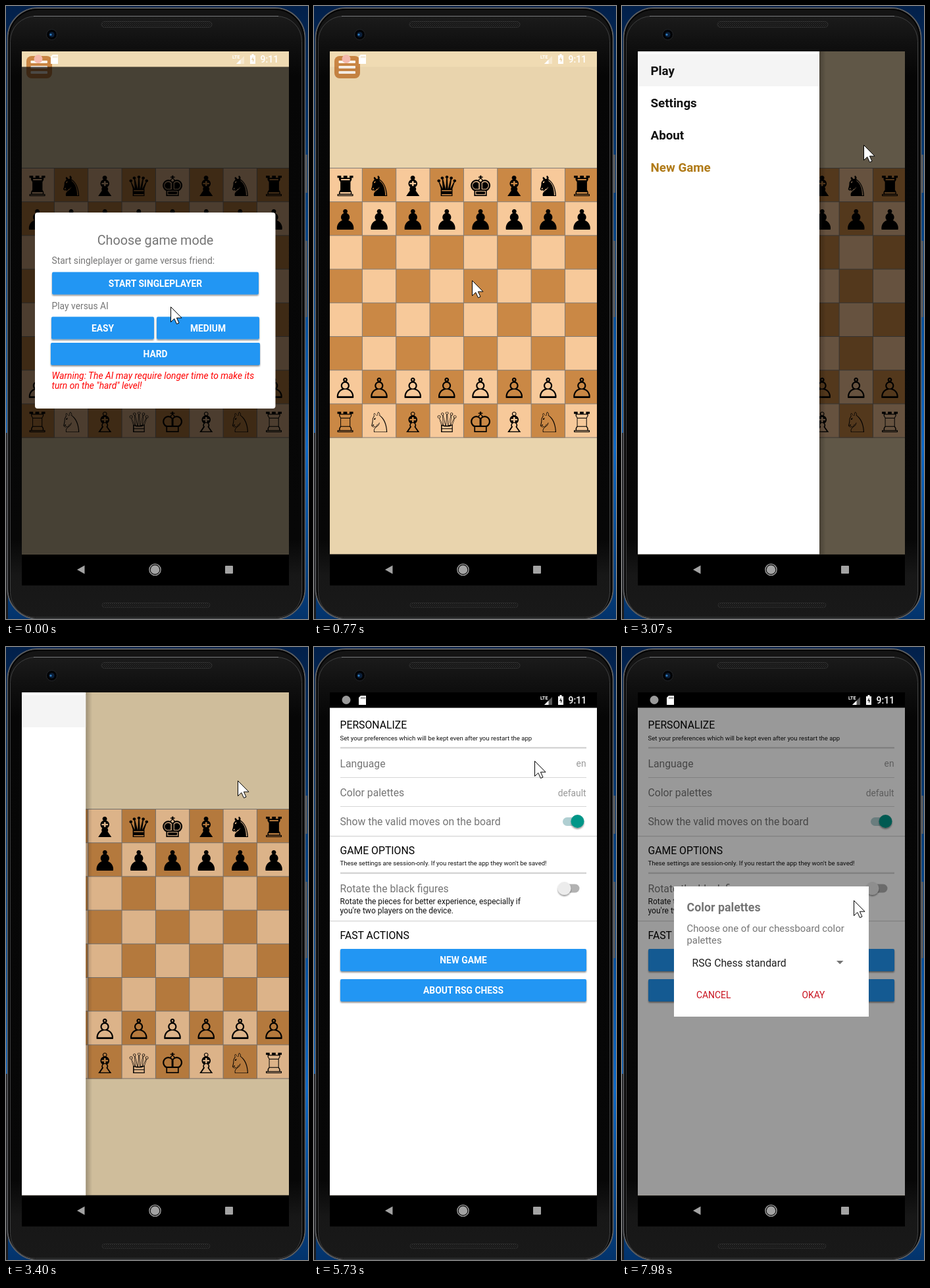
Recreate the animation shown at these times as an HTML page. Size 459 by 932 pixels, loop 8 s.

```html
<!DOCTYPE html>
<html lang="en">
<head>
<meta charset="utf-8">
<title>Chess app demo</title>
<style>
html, body { margin: 0; width: 100%; height: 100%; overflow: hidden; background: #03254f; }
svg { display: block; width: 459px; height: 932px; }
text { font-family: Roboto, sans-serif; white-space: pre; }
.b { font-weight: 700; }
.m { text-anchor: middle; }
.e { text-anchor: end; }
.man { font-family: "DejaVu Sans", sans-serif; text-anchor: middle; }
</style>
</head>
<body>
<svg id="stage" viewBox="0 0 459 932"></svg>
<script>
const rect = (x, y, w, h, fill, more = '') =>
  `<rect x="${x}" y="${y}" width="${w}" height="${h}" fill="${fill}" ${more}/>`;
const path = (d, fill, more = '') => `<path d="${d}" fill="${fill}" ${more}/>`;
const disc = (x, y, r, fill, more = '') => `<circle cx="${x}" cy="${y}" r="${r}" fill="${fill}" ${more}/>`;
const text = (x, y, size, fill, s, cls = '', more = '') =>
  `<text x="${x}" y="${y}" font-size="${size}" fill="${fill}" class="${cls}" ${more}>${s}</text>`;
const group = (id, s, more = '') => `<g id="${id}" ${more}>${s}</g>`;
const button = (x, y, w, h, s) =>
  rect(x, y, w, h, '#2196f3', 'rx="2" filter="url(#lift)"') +
  text(x + w / 2, y + h / 2 + 5.3, 13.8, '#fff', s, 'b m');

// ---- phone ----
const defs = `<defs>
  <linearGradient id="desk" x2="0" y2="1">
    <stop offset="0" stop-color="#02204a"/><stop offset=".25" stop-color="#053a75"/>
    <stop offset=".45" stop-color="#064a92"/><stop offset=".72" stop-color="#0c6aca"/>
    <stop offset=".85" stop-color="#07509c"/><stop offset="1" stop-color="#03336b"/>
  </linearGradient>
  <linearGradient id="shell" x2="0" y2="1">
    <stop offset="0" stop-color="#1b1b1b"/><stop offset=".05" stop-color="#0f0f0f"/>
    <stop offset=".1" stop-color="#060606"/><stop offset=".87" stop-color="#070707"/>
    <stop offset=".93" stop-color="#171717"/><stop offset="1" stop-color="#191919"/>
  </linearGradient>
  <linearGradient id="edge">
    <stop offset="0" stop-color="#000" stop-opacity=".24"/><stop offset="1" stop-color="#000" stop-opacity="0"/>
  </linearGradient>
  <pattern id="mesh" width="3" height="3" patternUnits="userSpaceOnUse">
    ${rect(0, 0, 3, 3, '#0c0c0c')}${path('M0 0L3 3M3 0L0 3', 'none', 'stroke="#3a3a3a" stroke-width=".6"')}
  </pattern>
  <filter id="lift" x="-5%" y="-20%" width="110%" height="150%">
    <feDropShadow dx="0" dy="1.8" stdDeviation="1.3" flood-opacity=".45"/>
  </filter>
  <clipPath id="screen">${rect(24, 69, 406, 764.5, '#fff')}</clipPath>
</defs>`;

const phone =
  rect(0, 0, 459, 932, 'url(#desk)') +
  rect(0, 649, 3, 283, '#1c1d20') +
  rect(454, 226, 4, 58, '#55585d') + rect(454, 357, 4, 116, '#55585d') +
  rect(2.5, 3, 452, 929, '#141414', 'rx="46" stroke="#5c5e61" stroke-width="2"') +
  rect(4.5, 5, 448, 925, 'none', 'rx="44" stroke="#050505" stroke-width="2"') +
  rect(6.5, 15.5, 443, 914, 'url(#shell)', 'rx="38" stroke="#3f4041"') +
  path('M42 15.5H414', 'none', 'stroke="#77797b"') +
  rect(145, 23.5, 168, 9, 'url(#mesh)', 'rx="4.5" stroke="#2f2f2f"') +
  rect(146, 907.5, 164, 7, 'url(#mesh)', 'rx="3.5" stroke="#2a2a2a"') +
  disc(69.5, 43.5, 8, '#020305', 'stroke="#25272a"') +
  disc(69.5, 43.5, 4, '#0a1f3a') + disc(68, 43.5, 1.6, '#2f7fc4') +
  rect(24, 69, 406, 812, '#000') +
  path('M108 857L119.5 850.5V863.5Z', '#a3a3a3') +
  disc(226.5, 857, 6.8, '#a3a3a3') +
  disc(226.5, 857, 8.6, 'none', 'stroke="#a3a3a3" stroke-width="1.4"') +
  rect(333, 851, 12, 12, '#a3a3a3', 'rx="1"');

// ---- board ----
const LIGHT = '#ffcf9f', DARK = '#d18c47', SAND = '#f0dbb3';
const ROWS = { 0: '♜♞♝♛♚♝♞♜', 1: '♟♟♟♟♟♟♟♟', 6: '♙♙♙♙♙♙♙♙', 7: '♖♘♗♕♔♗♘♖' };
const DX = 51.35, DY = 51.2;

// Type size and base line at which a rook is 31.5 px tall.
function rookFit() {
  const pen = document.createElement('canvas').getContext('2d');
  pen.font = '100px "DejaVu Sans", sans-serif';
  const ink = pen.measureText('♜');
  const up = ink.actualBoundingBoxAscent, down = ink.actualBoundingBoxDescent;
  const size = 3150 / (up + down);
  return [size, 43.2 - down * size / 100];
}

function board() {
  const [size, base] = rookFit();
  let cells = '', men = '', lines = '';
  for (let r = 0; r < 8; r++) for (let c = 0; c < 8; c++) {
    const x = 22 + c * DX, y = 246.5 + r * DY;
    cells += rect(x, y, DX + .5, DY + .5, (r + c) % 2 ? DARK : LIGHT);
    if (ROWS[r]) men += text(x + 25.7, y + base, size, '#000', ROWS[r][c], 'man');
  }
  for (let i = 0; i < 9; i++)
    lines += `M24 ${246.5 + i * DY}H430M${22 + i * DX} 246.5V656`;
  return cells + path(lines, 'none', 'stroke="#85807c"') + men;
}

const burger = rect(31, 76, 39, 34, DARK, 'rx="8" id="key"') +
  group('bars', [83, 91, 99].map(y => rect(37.5, y, 25.5, 4, 'currentColor', 'rx="1"')).join(''));

const statusIcons = (dot, bolt) =>
  disc(49, 80.5, 6.5, dot) +
  path('M71 74H79V88H68V77Z', '#fff') + path('M72 76V79M74.5 76V79M77 76V79', 'none', `stroke="${bolt}"`) +
  text(344, 79.5, 7, '#fff', 'LTE', 'b') +
  path('M350 88L362 76V88Z', '#fff', 'opacity=".35"') + path('M350 88L356.5 81.5V88Z', '#fff') +
  path('M371 75H373.5V73H376.5V75H379V88H371Z', '#fff') +
  path('M375.5 76.5L373 82H375V86L377.5 80.5H375.5Z', bolt) +
  text(386.5, 86, 14, '#fff', '9:11', '', 'font-weight="500"');

// ---- panels ----
const GREY = '#757575';
const modeDialog =
  rect(44, 314, 365.5, 298, '#fff', 'rx="4"') +
  text(227, 362.5, 19.75, GREY, 'Choose game mode', 'm') +
  text(69.5, 392, 13.85, GREY, 'Start singleplayer or game versus friend:') +
  button(70, 404.5, 314, 34, 'START SINGLEPLAYER') +
  text(69.5, 461, 13.85, GREY, 'Play versus AI') +
  button(69, 472.5, 156, 34, 'EASY') + button(229, 472.5, 156, 34, 'MEDIUM') +
  button(68, 512, 318, 34, 'HARD') +
  ['Warning: The AI may require longer time to make its', 'turn on the "hard" level!']
    .map((s, i) => text(69.5, 566.5 + i * 15.5, 13.83, '#f00', s, '', 'font-style="italic"')).join('');

const drawer =
  rect(300, 69, 10, 765, 'url(#edge)') + rect(24, 69, 276, 765, '#fff') +
  rect(24, 73, 276, 49, '#f4f4f4') +
  ['Play', 'Settings', 'About', 'New Game'].map((s, i) =>
    text(43.5, 104.5 + i * 49, 18.8, i < 3 ? '#111' : '#b07a17', s, 'b')).join('');

const rule = (y, h, full) => rect(full ? 24 : 40, y, full ? 406 : 374, h, '#d6d6d6');
const label = (y, s, fill = GREY) => text(39.5, y, 15.75, fill, s);
const note = (y, s, size) => text(39.5, y, size, '#111', s);
const settings =
  rect(24, 69, 406, 765, '#fff') + rect(24, 69, 406, 23.5, '#000') + statusIcons('#9b9b9b', '#333') +
  label(124, 'PERSONALIZE', '#000') +
  note(142, 'Set your preferences which will be kept even after you restart the app', 9.57) +
  rule(152, 2.5) + label(182.5, 'Language') + text(413.5, 182, 13.8, '#999', 'en', 'e') +
  rule(198, 1) +
  group('palRow', label(227, 'Color palettes') + text(413.5, 226.5, 13.8, '#999', 'default', 'e')) +
  rule(242, 1) + label(271, 'Show the valid moves on the board') +
  rect(378, 259, 28, 13, '#b0cfd2', 'rx="6.5"') + disc(400.5, 265, 10, '#009688', 'filter="url(#lift)"') +
  rule(287, 1.3, true) + label(314.5, 'GAME OPTIONS', '#000') +
  note(332, "These settings are session-only. If you restart the app they won't be saved!", 9.57) +
  rule(342.5, 2.5) + label(372.5, 'Rotate the black figures') +
  rect(376, 360.5, 27.5, 13, '#b2b2b2', 'rx="6.5"') + disc(380.5, 367, 10, '#ececec', 'filter="url(#lift)"') +
  note(391, 'Rotate the pieces for better experience, especially if', 12) +
  note(405, "you're two players on the device.", 12) +
  rule(416, 1.3, true) + label(444, 'FAST ACTIONS', '#000') +
  button(40, 459, 374, 34, 'NEW GAME') + button(40, 505, 374, 34, 'ABOUT RSG CHESS');

const paletteDialog =
  rect(79, 364, 296, 198, '#fff') +
  text(98.5, 402, 17.8, GREY, 'Color palettes', 'b') +
  text(98.5, 433, 14.85, GREY, 'Choose one of our chessboard color') +
  text(98.5, 450.5, 14.85, GREY, 'palettes') +
  text(106.5, 485.5, 15.75, '#212121', 'RSG Chess standard') +
  path('M326 477H336.5L331.25 482.3Z', GREY) +
  text(113, 533.5, 13.9, '#c8101c', 'CANCEL') + text(273.5, 533.5, 13.8, '#c8101c', 'OKAY');

const arrow = path('M.5.5V23.5L5.8 18.500 9.500 26.500 13 25 9.400 17.200H17Z', '#fff');

document.getElementById('stage').innerHTML = defs + phone +
  `<g clip-path="url(#screen)">` +
  rect(24, 69, 406, 765, SAND) + board() + group('burger', burger) +
  rect(24, 92.5, 406, 742, '#000', 'id="modeDim"') +
  group('homeStatus', statusIcons('#f4b9ad', '#e9d2a8')) +
  rect(24, 69, 406, 765, '#000', 'id="drawerDim"') + group('drawer', drawer) +
  group('modeDialog', modeDialog) + group('settings', settings) +
  rect(24, 92.5, 406, 742, '#000', 'id="palDim"') + group('palDialog', paletteDialog) +
  '</g>' + group('cursor', arrow);

// ---- motion ----
const $ = id => document.getElementById(id);
const attr = (id, name, v) => $(id).setAttribute(name, v);
const alpha = (id, v) => attr(id, 'opacity', clamp(v));
const move = (id, x, y) => attr(id, 'transform', `translate(${x} ${y})`);
const clamp = v => Math.max(0, Math.min(1, v));
const smooth = v => (v = clamp(v), v * v * (3 - 2 * v));
const mix = (a, b, p) => a + (b - a) * p;

// Number of picture steps done out of n, the first at a and the last at b.
const steps = (t, a, b, n) => t < a ? 0 : t >= b ? n :
  Math.min(n, 1 + Math.floor((t - a) / (b - a) * (n - 1) + .03));

function cursorAt(t) {
  const go = (a, b, p, q = p) => [mix(a[0], b[0], p), mix(a[1], b[1], q)];
  if (t < 1000) return go([250, 457], [240, 417], steps(t, 80, 230, 3) / 3);
  if (t < 1840) return go([240, 417], [77, 104], smooth(steps(t, 1000, 1770, 11) / 11));
  if (t < 2230) return go([77, 104], [56, 96], steps(t, 1840, 2000, 3) / 3);
  if (t < 3070) return go([56, 96], [365, 210], smooth((steps(t, 2230, 3000, 11) - 2) / 9));
  if (t < 4090) {
    const u = clamp((steps(t, 3240, 4020, 11) - 2) / 9);
    return u < .8 ? go([367, 211], [80, 67], smooth(u / .8)) : go([80, 67], [50, 83], (u - .8) / .2);
  }
  if (t < 6340) {
    const left = 1 - steps(t, 5500, 6270, 11) / 11;
    return go([50, 91], [372, 220], 1 - left ** 4.78, 1 - left ** 2.23);
  }
  if (t < 7750) return go([372, 220], [370, 225], steps(t, 6340, 6590, 4) / 4);
  return go([370, 225], [352, 385], smooth(steps(t, 7750, 7980, 4) / 4));
}

function draw() {
  const t = performance.now() % 8000;

  const closing = steps(t, 610, 850, 4) / 4;
  alpha('modeDialog', 1 - closing * 1.5);
  alpha('modeDim', .7 * (1 - closing) ** 2.2);

  const bar = t < 1080;
  alpha('homeStatus', bar ? 1 : 0);
  attr('key', 'fill', bar ? '#c98543' : DARK);
  attr('bars', 'color', bar ? '#fbf3ea' : SAND);
  alpha('bars', t >= 4410 ? .5 : 1);

  const open = t < 3240 ? smooth(steps(t, 2230, 3000, 11) / 7.8)
                        : 1 - smooth(steps(t, 3240, 4020, 11) / 5);
  move('drawer', -276 * (1 - open) - (open ? 0 : 20), 0);
  alpha('drawerDim', .6 * (open - .163) / .837);

  const enter = steps(t, 4960, 5190, 4) / 4;
  alpha('settings', enter * 1.3);
  move('settings', 0, 60 * (1 - enter) ** 2);
  alpha('palRow', t >= 7350 && t < 7750 ? .45 : 1);

  const pop = steps(t, 7750, 7980, 4) / 4;
  alpha('palDim', .4 * pop);
  alpha('palDialog', pop * 1.2);

  move('cursor', ...cursorAt(t).map(Math.round));
  attr('cursor', 'stroke', t >= 2230 && t < 2380 ? '#1f9a1f' : '#000');
  requestAnimationFrame(draw);
}
draw();
</script>
</body>
</html>
```
